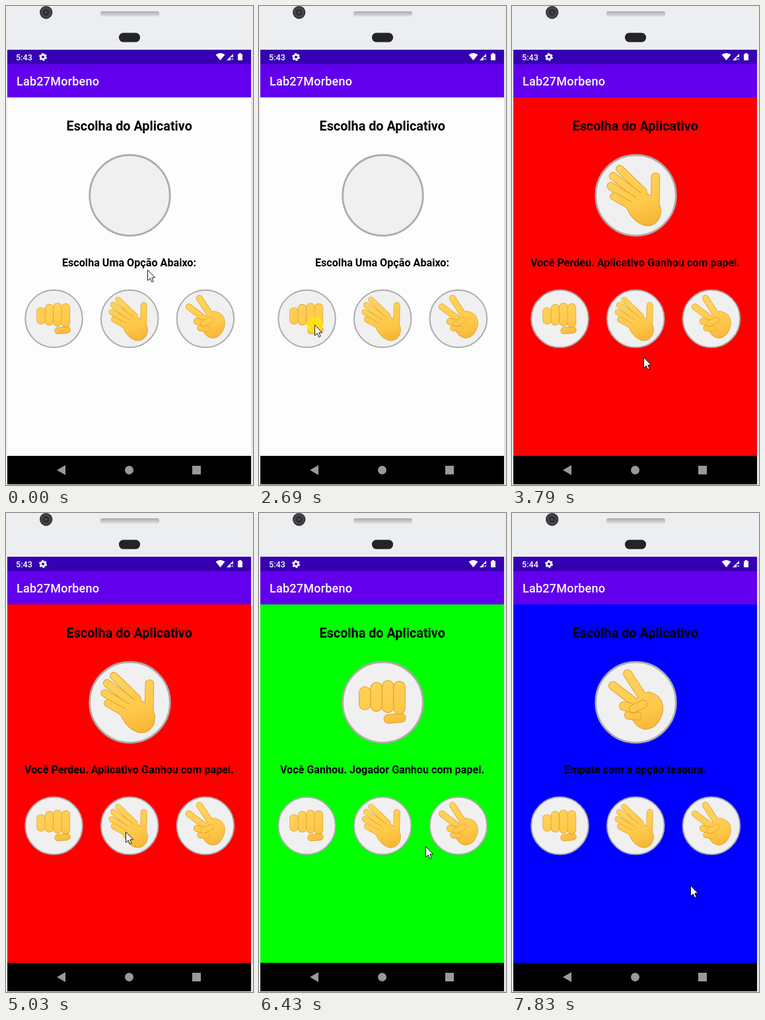
Animation, 374 px wide and 723 px high, one loop 8 s. Source, as an HTML page:

```html
<!DOCTYPE html>
<html lang="pt">
<head>
<meta charset="utf-8">
<title>Pedra, papel e tesoura</title>
<style>
  html, body { margin: 0; width: 100%; height: 100%; overflow: hidden; background: #eceef0; }
  svg { display: block; width: 374px; height: 723px; font-family: Roboto, sans-serif; }
  .bold { font-weight: 700; text-anchor: middle; }
  .medium { font-weight: 500; fill: #fff; }
  .limb { stroke-linecap: round; stroke-linejoin: round; }
  .disc { fill: #f0f0f0; stroke: #acacac; }
</style>
</head>
<body>
<svg viewBox="0 0 374 723">
  <defs>
    <linearGradient id="skin" gradientUnits="userSpaceOnUse" x1="-8" y1="-30" x2="12" y2="34">
      <stop offset="0" stop-color="#ffd35c"/><stop offset=".6" stop-color="#ffc94a"/><stop offset="1" stop-color="#f5b435"/>
    </linearGradient>
    <linearGradient id="speaker" x2="0" y2="1">
      <stop offset="0" stop-color="#a9abad"/><stop offset="1" stop-color="#e0e1e3"/>
    </linearGradient>
    <radialGradient id="lens">
      <stop offset="0" stop-color="#66686c"/><stop offset=".3" stop-color="#242528"/><stop offset=".65" stop-color="#4a4b4e"/><stop offset="1" stop-color="#2c2d2f"/>
    </radialGradient>
  </defs>

  <rect width="374" height="723" fill="#eceef0"/>
  <path d="M372.5 66V722" stroke="#d9dadb"/>
  <circle cx="60.7" cy="9.7" r="9.7" fill="url(#lens)"/>
  <rect x="143" y="8" width="89" height="8" rx="3" fill="url(#speaker)"/>
  <rect x="171" y="40.5" width="32" height="14" rx="6.5" fill="#232426"/>

  <rect x="2" y="66" width="369" height="22" fill="#3700b3"/>
  <rect x="2" y="88" width="369" height="50" fill="#6200ee"/>
  <text id="clock" class="medium" x="15" y="81.7" font-size="12.6"></text>
  <g stroke="#fff" fill="none">
    <circle cx="56" cy="77" r="3.4" stroke-width="2.6"/>
    <circle cx="56" cy="77" r="5.1" stroke-width="1.8" stroke-dasharray="2.8 2.54"/>
  </g>
  <g fill="#fff">
    <path d="M317.5 73.5Q324.5 68.5 331.5 73.5L324.5 82Z"/>
    <path d="M334 82L344 72V77H340V82Z"/>
    <path d="M341 78.5L344 81.5M344 78.5L341 81.5" stroke="#fff" stroke-width=".9"/>
    <path d="M351 72.5H353V71H356V72.5H358V82H351Z"/>
  </g>
  <text class="medium" x="16" y="120" font-size="18" letter-spacing=".22">Lab27Morbeno</text>

  <rect id="page" x="2" y="138" width="369" height="541"/>
  <text class="bold" x="186.7" y="187.5" font-size="19.8">Escolha do Aplicativo</text>
  <circle class="disc" cx="187.5" cy="285.8" r="60.8" stroke-width="2.8"/>
  <g id="choice" transform="translate(187.5 285.8) scale(1.39)"></g>
  <text id="message" class="bold" x="186.5" y="393" font-size="16.15"></text>
  <g id="options"></g>

  <rect x="2" y="679" width="369" height="43"/>
  <g fill="#999">
    <path d="M77 700.5L90 693V708Z"/>
    <circle cx="186.5" cy="700.5" r="6.5"/>
    <rect x="282" y="694" width="13" height="13"/>
  </g>

  <g id="cursor">
    <circle id="press" r="12.5" fill="#fe0" opacity=".65"/>
    <path d="M.5.5V16.4L4.2 13L6.7 18.7L9.2 17.6L6.8 12H11.6Z" fill="#fff" stroke="#000" stroke-width=".9"/>
  </g>
</svg>
<script>
const LOOP = 8000, STEP = 78, PRESS = 80, CLOCK_TICK = 7050;
const el = id => document.getElementById(id);

// Hands are rounded strokes: an edge colour slightly wider than the skin.
const stroke = (d, width, color) =>
  `<path class="limb" d="${d}" stroke-width="${width}" stroke="${color}" fill="${color}"/>`;
const edge = ([d, width]) => stroke(d, width + 1.3, '#dc9a24');
const skin = ([d, width]) => stroke(d, width, 'url(#skin)');
const limb = (x1, y1, x2, y2, width) => [`M${x1} ${y1}L${x2} ${y2}`, width];
const outlined = limbs => limbs.map(part => edge(part) + skin(part)).join('');
const hand = (back, palm, front = []) => edge(palm) + outlined(back) + skin(palm) + outlined(front);
const four = make => [0, 1, 2, 3].map(make);

const knuckles = four(i => {
  const x = -19.5 + 12.5 * i;
  return limb(x, -17.5 + 1.4 * (i - 2.2) ** 2, x, 2 + 1.5 * i, 12);
});
const fan = four(i => {
  const angle = (238 - 13 * i) * Math.PI / 180, reach = 48 - 1.6 * i * i;
  return limb(8 + reach * Math.cos(angle), 12 + reach * Math.sin(angle), 8 - 4.7 * i, 5 * i - 4, 7.5);
});
const hands = {
  rock: hand([], limb(6, 18, 20, 17, 9), knuckles),
  paper: hand([limb(21.5, -20, 21, 8, 8.5), ...fan],
    ['M8-3L18 3Q30 12 24 25Q16 36 4 29Q-6 22-9 12Z', 2]),
  scissors: hand([limb(-9, -31, 10, -2, 8.5), limb(-25, -18, 4, 4, 8.5)],
    ['M-4 14Q0-8 14-10Q30-6 28 10Q23 28 10 28Q0 26-4 14Z', 2],
    [limb(-8, 14, 2, 15, 8), limb(-13, 4, -2, 7, 9), limb(-3, 7, 8, 2, 8)])
};

const rounds = [
  { at: 0, color: '#fdfdfd', message: 'Escolha Uma Opção Abaixo:' },
  { at: 2770, color: '#f00', choice: 'paper', message: 'Você Perdeu. Aplicativo Ganhou com papel.' },
  { at: 5490, color: '#0f0', choice: 'rock', message: 'Você Ganhou. Jogador Ganhou com papel.' },
  { at: 7590, color: '#00f', choice: 'scissors', message: 'Empate com a opção tesoura.' }
];

// Cursor stops: the glide to each lasts from its start to its end time.
const stops = [
  { start: 0, end: 0, x: 214, y: 398 },
  { start: 300, end: 450, x: 160, y: 262 },
  { start: 530, end: 610, x: 234, y: 300 },
  { start: 690, end: 990, x: 213, y: 657 },
  { start: 1060, end: 1140, x: 210, y: 635 },
  { start: 1218, end: 1750, x: 198, y: 307 },
  { start: 2070, end: 2610, x: 84, y: 481 },
  { start: 2940, end: 3090, x: 113, y: 501 },
  { start: 3240, end: 3790, x: 199, y: 530 },
  { start: 3868, end: 4020, x: 197, y: 506 },
  { start: 4100, end: 4570, x: 181, y: 481 },
  { start: 5570, end: 5740, x: 211, y: 545 },
  { start: 6040, end: 6800, x: 283, y: 471 },
  { start: 6890, end: 7210, x: 283, y: 463 },
  { start: 7590, end: 7830, x: 270, y: 562 }
];

function cursorAt(t) {
  const i = stops.findLastIndex(stop => t >= stop.start);
  const to = stops[i], from = stops[Math.max(0, i - 1)];
  const steps = Math.round((to.end - to.start) / STEP) + 1;
  const u = Math.min(1, (Math.floor((t - to.start) / STEP) + 1) / steps);
  const ease = u * u * (3 - 2 * u);
  return ['x', 'y'].map(axis => Math.round(from[axis] + (to[axis] - from[axis]) * ease));
}

let shown;
function showRound(round) {
  if (round === shown) return;
  shown = round;
  el('page').setAttribute('fill', round.color);
  el('choice').innerHTML = hands[round.choice] ?? '';
  el('message').textContent = round.message;
}

function render(t) {
  showRound(rounds.findLast(round => t >= round.at));
  const pressed = rounds.some(({ at }) => t >= at - PRESS && t < at);
  el('press').style.display = pressed ? '' : 'none';
  el('clock').textContent = t < CLOCK_TICK ? '5:43' : '5:44';
  el('cursor').setAttribute('transform', `translate(${cursorAt(t)})`);
}

el('options').innerHTML = Object.values(hands).map((shape, i) =>
  `<g transform="translate(${72.5 + 114.7 * i} 472)">
    <circle class="disc" r="43.3" stroke-width="2"/>${shape}</g>`).join('');

const began = performance.now();
function tick() {
  render((performance.now() - began) % LOOP);
  requestAnimationFrame(tick);
}
tick();
</script>
</body>
</html>
```
